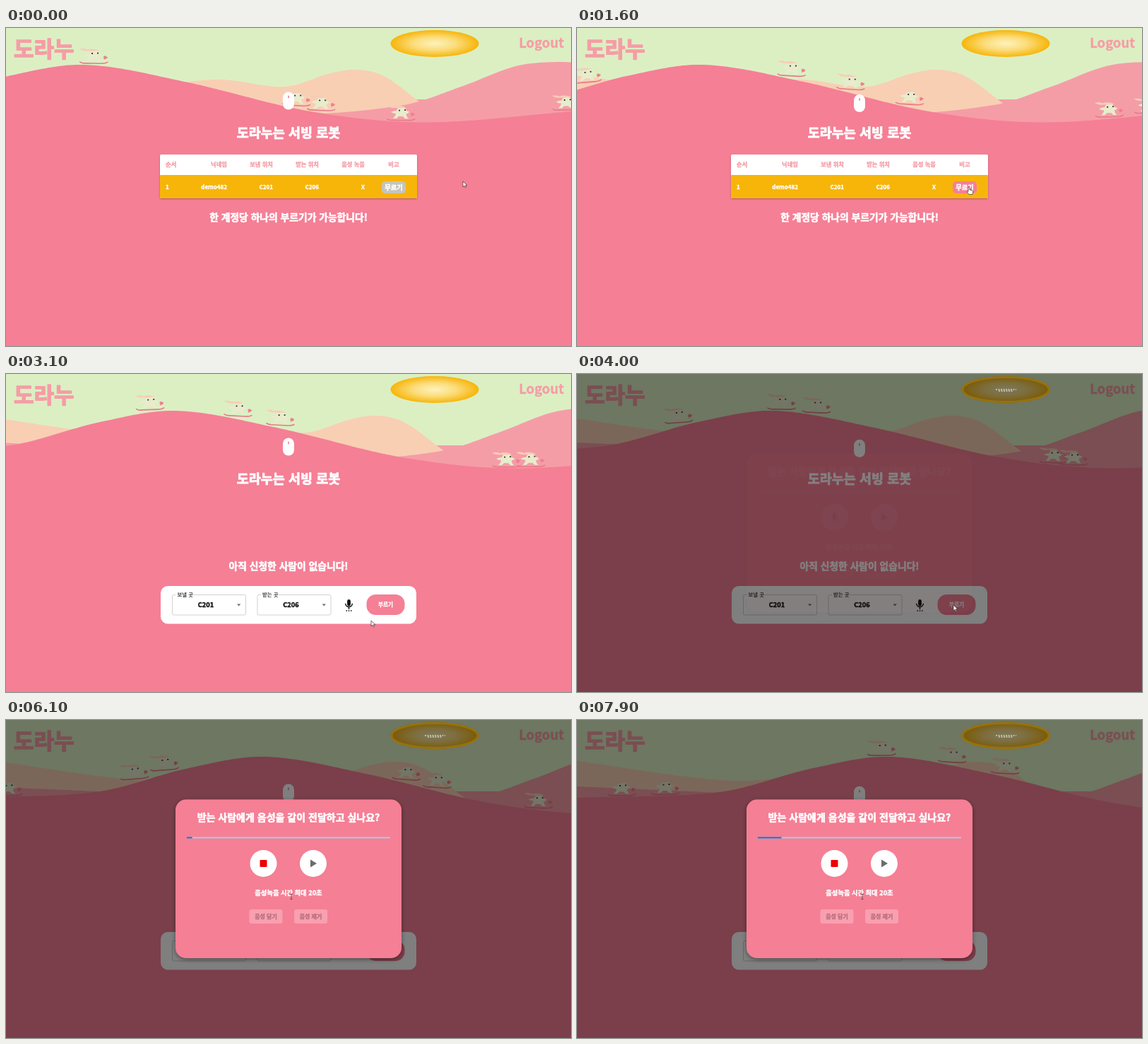
Animation of 800x450 px, one loop 8 s. Source, as an HTML page:

```html
<!DOCTYPE html>
<html lang="ko">
<head>
<meta charset="utf-8">
<style>
  html, body { margin: 0; width: 100%; height: 100%; overflow: hidden; background: #f57f95; }
  svg { display: block; width: 800px; height: 450px; }
  text { font-family: "Noto Sans CJK KR", "Noto Sans CJK", "Noto Sans", sans-serif; font-weight: 900; }
</style>
</head>
<body>
<svg id="stage" viewBox="0 0 800 450" xmlns="http://www.w3.org/2000/svg"></svg>
<script>
const LOOP = 8000, STEP = 100;
const PINK = '#f57f95', ROSE = '#f59da6', PEACH = '#f8cfb3', SKY = '#dcefc3', GOLD = '#f7b50a';

// Text centred on y, slightly thickened by a stroke of its own colour.
const label = (s, x, y, size, fill = '#fff', anchor = 'middle', heavy = .045) =>
  `<text x="${x}" y="${y}" dy=".37em" font-size="${size}" fill="${fill}" text-anchor="${anchor}"
    stroke="${fill}" stroke-width="${size * heavy}" stroke-linejoin="round">${s}</text>`;
const box = (x, y, w, h, r, fill, extra = '') =>
  `<rect x="${x}" y="${y}" width="${w}" height="${h}" rx="${r}" fill="${fill}" ${extra}/>`;
const disc = x => `<circle cx="${x}" cy="203" r="19" fill="#fff"/>`;
const mic = (x, y, k, fill, dots = '') => `
  <g transform="translate(${x} ${y}) scale(${k})" fill="none" stroke="${fill}" stroke-width="1.5">
    ${box(-2.4, -8, 4.8, 9.4, 2.4, fill, 'stroke="none"')}
    <path d="M-4.8-2.2a4.8 4.8 0 0 0 9.6 0M0 2.8V6"/>${dots}
  </g>`;
const select = (x, name, value) => `
  ${box(x, 312.5, 104, 28.5, 2, '#fff', 'stroke="#c9c4c5" stroke-width=".8"')}
  ${box(x + 5, 310, 25, 5, 0, '#fff')}
  ${label(name, x + 7, 312, 7.4, '#444', 'start', 0)}
  ${label(value, x + 47.5, 327, 9.3, '#151515')}
  <path d="M${x + 91.5} 325.5h5.4l-2.7 2.8z" fill="#666"/>`;
const action = (x, s) => box(x, 268, 47, 20, 3, '#fff', 'fill-opacity=".25"') + label(s, x + 23.5, 278, 8, '#b96f7c');
const row = ([first, ...rest], y, size, fill) => label(first, 226, y, size, fill, 'start') +
  rest.map((s, i) => label(s, 313 + 65 * i, y, size, fill, 'end')).join('');

const stage = document.getElementById('stage');
stage.innerHTML = `
<defs>
  <radialGradient id="sunFill"><stop offset="0" stop-color="#fdf3bd"/><stop offset=".5" stop-color="#fbdc79"/><stop offset="1" stop-color="${GOLD}"/></radialGradient>
  <filter id="shade" x="-10%" y="-10%" width="120%" height="125%"><feDropShadow dx="0" dy="2" stdDeviation="3" flood-opacity=".4"/></filter>
  <filter id="lift" x="-5%" y="-10%" width="110%" height="125%"><feDropShadow dx="0" dy="1" stdDeviation="1" flood-opacity=".3"/></filter>
  <g id="rider">
    <path d="M-20 10q3 2 8 1.500h22q6 0 9-2" fill="none" stroke="#e9798c" stroke-width="1.600" stroke-linecap="round"/>
    <path d="M-7-2q1-5 7-5q6 0 7 5l4 1q-1 3-4 3q-1 3 3 7h-5l-3-3h-6l-3 3h-5q4-4 4-7q-4 0-7-2q4-2 8-2z" fill="#e8eccd"/>
    <path d="M-21-9q7-1 11 1q6-2 13 0l4 1q-8 2-16 1q-7 1-12-3z" fill="#f8cdb8"/>
    <path d="M13 2q2-3 4-.5q3 0 1 2.500l-4 2z" fill="#ef7f91"/>
    <path d="M-4-2.500h2M4-3h2" stroke="#333" stroke-width="1.800"/>
  </g>
</defs>
<rect width="800" height="450" fill="${SKY}"/>
<ellipse cx="607" cy="22" rx="62.500" ry="19" fill="url(#sunFill)"/>
${box(430, 101, 370, 50, 0, ROSE)}
<path id="far" fill="${PEACH}"/><path id="mid" fill="${ROSE}"/><path id="near" fill="${PINK}"/>
<g id="riders"></g>
${label('도라누', 11, 30, 31, ROSE, 'start')}
${label('Logout', 790, 21, 18.5, ROSE, 'end', .02)}
<g id="mouse">${box(392, 90.5, 16, 25, 8, '#fff')}${box(399.2, 95.5, 1.6, 4, .8, PINK)}</g>
${label('도라누는 서빙 로봇', 400, 148, 18.5)}
<g id="listPage">
  <g filter="url(#lift)">${box(218, 179, 364, 62, 2, '#fff')}</g>
  ${box(218, 208, 364, 33, 1, GOLD)}
  ${row(['순서', '닉네임', '보낸 위치', '받는 위치', '음성 녹음'], 193, 8.3, ROSE)}
  ${label('비고', 549, 193, 8.3, ROSE)}
  ${row(['1', 'demo482', 'C201', 'C206', 'X'], 225, 8, '#fff')}
  <rect id="undo" x="532" y="217" width="34" height="17" rx="5"/>
  ${label('무르기', 549, 225.5, 9.3)}
  ${label('한 계정당 하나의 부르기가 가능합니다!', 400, 268, 13.8)}
</g>
<g id="formPage">
  ${label('아직 신청한 사람이 없습니다!', 400, 272, 13.8)}
  ${box(219, 300, 362, 53.5, 10, '#fff')}
  ${select(235.5, '보낼 곳', 'C201')}${select(356, '받는 곳', 'C206')}
  ${mic(485.5, 327, 1, '#111', '<path d="M-4 8h8" stroke-dasharray="1.6 1.600"/>')}
  ${box(510.5, 312, 54, 29, 13, PINK)}${label('부르기', 537.5, 326.5, 7.6)}
</g>
<rect id="backdrop" width="800" height="450"/>
<g id="glow" fill="none"><ellipse cx="607" cy="22" rx="61" ry="17.500" stroke="#b8850b" stroke-width="3" stroke-opacity=".5"/>
  <path d="M593 22h29M597 24h20" stroke="#d8d0b8" stroke-width="1.500" stroke-dasharray="2 1.500"/></g>
<g id="modal">
  ${box(240, 112.5, 320, 224.5, 15, PINK, 'filter="url(#shade)"')}
  ${label('받는 사람에게 음성을 같이 전달하고 싶나요?', 400, 138, 14)}
  ${box(256, 165.5, 288, 2, 0, '#a7caee')}
  <rect id="bar" x="256" y="165.500" height="2" fill="#1f6fbd"/>
  ${disc(364.5)}${disc(435)}
  <g id="idle">${mic(364.5, 204, .9, '#555')}</g>
  <g id="stop">${box(359.5, 198, 10, 10, 1, '#f00000')}</g>
  <path d="M431 197.500v11l9-5.500z" fill="#6c6c6c"/>
  ${label('음성녹음 시간 최대 20초', 400, 245, 9.25)}
  ${action(344.5, '음성 담기')}${action(408, '음성 제거')}
</g>
<g id="cursor" stroke-linejoin="round">
  <path id="arrow" d="M0 0v8l2-1.800 1.400 2.800 1.200-.6L3.300 5.700H6z" fill="#fff" stroke="#333" stroke-width=".7"/>
  <path id="hand" d="M-1-3.500q1-1.200 2 0V0l4 1q1 .5 .7 2L5 6.500H0L-3 2.500q.4-1.300 2 0z" fill="#fff" stroke="#333" stroke-width=".7"/>
  <path id="beam" d="M-1.500-3.500h3M0-3.500v7M-1.500 3.500h3" fill="none" stroke="#444" stroke-width=".8"/>
</g>`;

const el = {};
stage.querySelectorAll('[id]').forEach(n => el[n.id] = n);

const clamp = v => Math.max(0, Math.min(1, v));
const ease = v => { v = clamp(v); return v * v * (3 - 2 * v); };

// Smooth curve through a few [x, y] points, straight beyond both ends.
function curve(points) {
  const last = points.length - 1;
  const tangent = i => {
    const [x0, y0] = points[Math.max(0, i - 1)], [x1, y1] = points[Math.min(last, i + 1)];
    return (y1 - y0) / (x1 - x0);
  };
  return x => {
    const end = x <= points[0][0] ? 0 : x >= points[last][0] ? last : -1;
    if (end >= 0) return points[end][1] + (x - points[end][0]) * tangent(end);
    let i = 0;
    while (x > points[i + 1][0]) i++;
    const [x0, y0] = points[i], [x1, y1] = points[i + 1];
    const w = x1 - x0, u = (x - x0) / w, v = 1 - u;
    return v * v * (1 + 2 * u) * y0 + u * u * (3 - 2 * u) * y1 + w * u * v * (v * tangent(i) - u * tangent(i + 1));
  };
}

// Each hill keeps its outline and drifts right at its own speed (px/s).
const hills = {
  far: { speed: 9.2, base: 160, y: curve([[-80, 57], [150, 86], [300, 73], [395, 83], [460, 64], [497, 59], [535, 68], [585, 104], [640, 145]]) },
  mid: { speed: 17, base: 160, y: curve([[-134, 94], [150, 107], [400, 122], [563, 109], [647, 82], [722, 54], [780, 48], [830, 51]]) },
  near: { speed: 42, base: 450, y: curve([[-330, 110], [-132, 89], [3, 68], [111, 52], [253, 76], [431, 118], [591, 133.5], [803, 118]]) }
};
hills.near.y = curve([[-330, 110], [-130, 102], [3, 68], [111, 52], [253, 76], [431, 118], [591, 133.5], [803, 118]]);
const hillY = (hill, x, s) => hill.y(x - hill.speed * s);

// Riders roll left: start x, pace (px/s) and an optional gathering rush.
const riders = [[125, 69], [412, 67], [447, 36, .2], [560, 55], [794, 24, .35], [880, 44], [1255, 82]];
const riderX = ([start, pace, rush = 0], s) => start - pace * s - rush * s ** 3;
el.riders.innerHTML = '<use href="#rider"/>'.repeat(riders.length);

// Pointer moves: start ms, duration, destination.
const moves = [[300, 800, 555, 229], [2100, 800, 517, 349], [3150, 450, 533, 327], [4100, 600, 373, 204], [5600, 400, 404, 250]];
const pointerAt = t => moves.reduce(([x, y], [start, span, tx, ty]) => {
  const u = ease((t - start) / span);
  return [x + (tx - x) * u, y + (ty - y) * u];
}, [647, 217]);

const show = (node, on) => node.style.display = on ? '' : 'none';
const between = (t, a, b) => t >= a && t < b;

function draw(t) {
  const s = t / 1000;
  for (const name in hills) {
    const hill = hills[name];
    let d = `M-10 ${hill.base}`;
    for (let x = -10; x <= 810; x += 5) d += `L${x} ${hillY(hill, x, s).toFixed(2)}`;
    el[name].setAttribute('d', d + `L810 ${hill.base}z`);
  }
  riders.forEach((rider, i) => {
    const x = riderX(rider, s), y = hillY(hills.near, x, s);
    const slope = (hillY(hills.near, x + 10, s) - hillY(hills.near, x - 10, s)) / 20;
    el.riders.children[i].setAttribute('transform',
      `translate(${x.toFixed(2)} ${(y - 13 - 16 * Math.abs(slope)).toFixed(2)}) rotate(${(slope * 15).toFixed(2)})`);
  });

  const list = t < 2100, recording = t >= 5550;
  show(el.listPage, list);
  show(el.formPage, !list);
  el.undo.setAttribute('fill', t >= 900 ? PINK : '#c5c5bb');

  const dim = clamp((t - 3700) / 250), fade = clamp((t - 3970) / 950);
  el.backdrop.setAttribute('opacity', dim * .5);
  el.glow.setAttribute('opacity', dim);
  el.modal.setAttribute('opacity', fade);

  el.mouse.setAttribute('transform', `translate(0 ${1.8 * (1 - Math.cos((s - .1) * Math.PI * 2 / 3))})`);
  el.bar.setAttribute('width', Math.max(0, (s - 5.57) * 288 / 20));
  show(el.idle, !recording);
  show(el.stop, recording);

  el.cursor.setAttribute('transform', `translate(${pointerAt(t)})`);
  const beam = t >= 5900, hand = between(t, 1000, 2200) || between(t, 4600, 5900);
  show(el.beam, beam);
  show(el.hand, hand);
  show(el.arrow, !beam && !hand);
}

const begin = performance.now();
function frame() {
  const t = (performance.now() - begin) % LOOP;
  draw(Math.floor(t / STEP) * STEP);
  requestAnimationFrame(frame);
}
frame();
</script>
</body>
</html>
```
